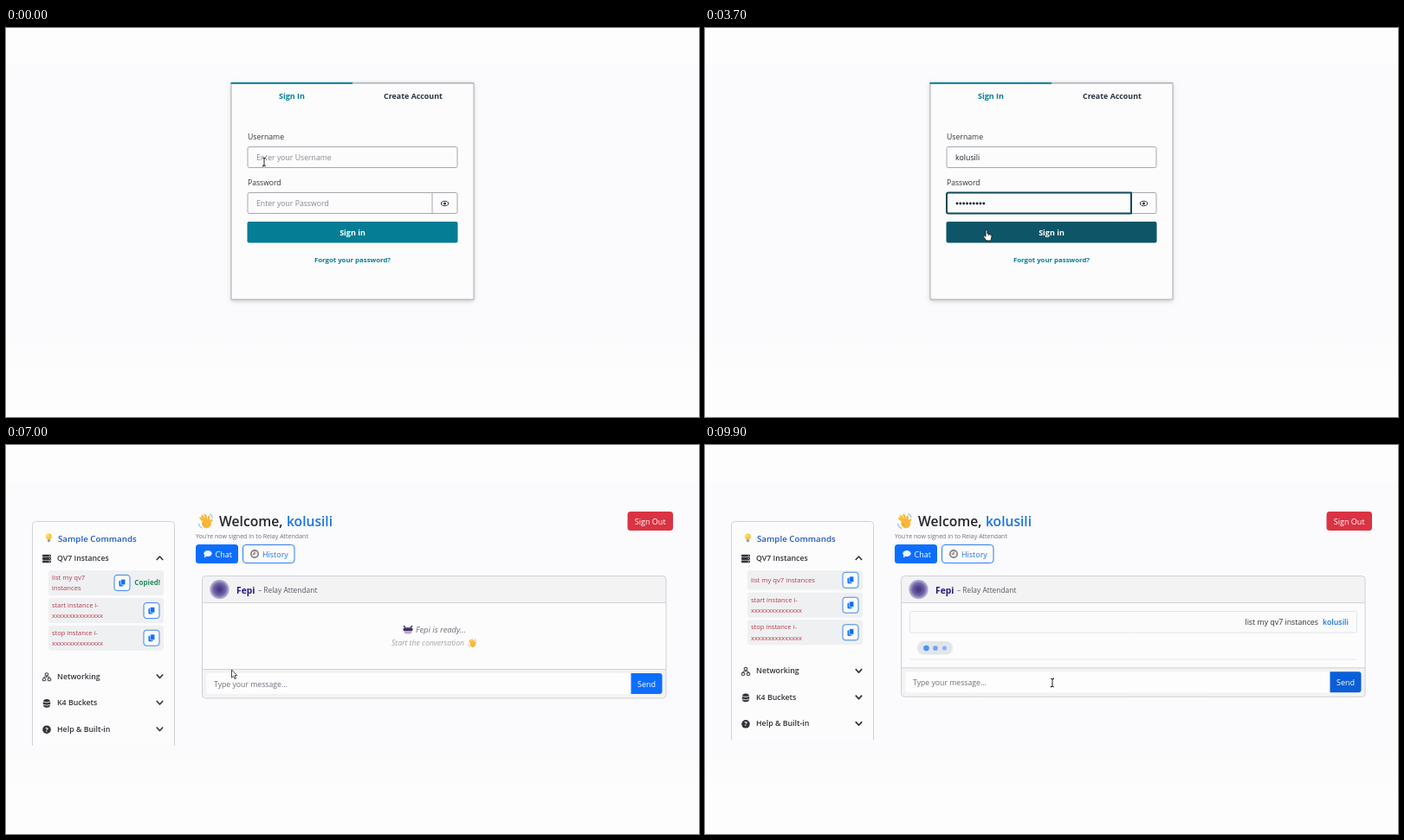
Animation, 800 px wide and 450 px high, one loop 10000 ms. Source, as an HTML page with a canvas:

```html
<!DOCTYPE html>
<html lang="en">
<head>
<meta charset="utf-8">
<title>Sign in and chat</title>
<style>
html, body { margin: 0; width: 100%; height: 100%; overflow: hidden; background: #fdfdfd; }
canvas { display: block; width: 800px; height: 450px; }
</style>
</head>
<body>
<canvas id="stage" width="800" height="450"></canvas>
<script>
const g = document.getElementById('stage').getContext('2d');
const LOOP = 10000, STEP = 100;
const USER = 'kolusili', BOT = 'Fepi', PRODUCT = 'Relay Attendant';
const COMMAND = 'list my qv7 instances';
const TEAL = '#047d95', BLUE = '#0d6efd', INK = '#30343a', LINE = '#cfd2d6';

const clamp = v => Math.max(0, Math.min(1, v));
const ease = v => v * v * (3 - 2 * v);
const ramp = (t, from, to) => ease(clamp((t - from) / (to - from)));

// y is the middle of the lowercase letters
function text(str, x, y, size, color, weight = 400, align = 'left', style = '') {
  g.font = `${style} ${weight} ${size}px "Open Sans", "Noto Sans", sans-serif`;
  g.textAlign = align;
  g.fillStyle = color;
  g.fillText(str, x, y + size * 0.36);
}

function box(x, y, w, h, r, fill, stroke, line = 1) {
  g.beginPath();
  g.roundRect(x, y, w, h, r);
  if (fill) { g.fillStyle = fill; g.fill(); }
  if (stroke) { g.strokeStyle = stroke; g.lineWidth = line; g.stroke(); }
}

function disc(x, y, r, color) {
  g.fillStyle = color;
  g.beginPath();
  g.arc(x, y, r, 0, 7);
  g.fill();
}

function path(points, color, width) {
  g.beginPath();
  points.forEach(([x, y]) => g.lineTo(x, y));
  g.strokeStyle = color;
  g.lineWidth = width;
  g.stroke();
}

function at(x, y, draw, angle = 0, scale = 1) {
  g.save();
  g.translate(x, y);
  g.rotate(angle);
  g.scale(scale, scale);
  draw();
  g.restore();
}

function shadow(color, blur, dy, draw) {
  g.save();
  g.shadowColor = color;
  g.shadowBlur = blur;
  g.shadowOffsetY = dy;
  draw();
  g.restore();
}

function backdrop() {
  g.fillStyle = '#fdfdfd';
  g.fillRect(0, 0, 800, 450);
  const fade = g.createLinearGradient(0, 42, 0, 408);
  fade.addColorStop(0, '#fbfbfd');
  fade.addColorStop(0.85, '#fbfbfd');
  fade.addColorStop(1, '#fdfdfd');
  g.fillStyle = fade;
  g.fillRect(0, 42, 800, 366);
}

function field(x, y, w, radii, focus) {
  box(x, y, w, 24, radii, '#fcfcfd', '#a4a8ad');
  if (focus > 0) {
    g.save();
    g.globalAlpha = focus;
    box(x, y, w, 24, radii, null, '#0d4a5a', 1 + focus);
    g.restore();
  }
}

function caret(x, y, t) {
  if (t % 1000 < 500) {
    g.fillStyle = '#222';
    g.fillRect(x, y - 5.5, 0.9, 11);
  }
}

function eye(x, y) {
  g.strokeStyle = INK;
  g.lineWidth = 1;
  g.beginPath();
  g.ellipse(x, y, 4.1, 2.7, 0, 0, 7);
  g.stroke();
  disc(x, y, 1.5, INK);
}

function suggestions(alpha) {
  g.save();
  g.globalAlpha = alpha;
  g.fillStyle = '#5c5a5c';
  g.beginPath();
  g.moveTo(344, 168);
  g.lineTo(349.5, 162.5);
  g.lineTo(355, 168);
  g.fill();
  box(338, 167.5, 96, 46, 4, '#5c5a5c');
  text(USER, 345, 181, 7.2, '#fff', 600);
  text(USER + '@gnelo.com', 345, 201.5, 7.2, '#fff', 600);
  g.restore();
}

function login(t) {
  shadow('rgba(0,0,0,.2)', 5, 1.5, () => box(260, 63.5, 280, 250.5, 0, '#fcfcfd'));
  box(260, 63.5, 280, 250.5, 0, null, '#a9acaf');
  g.fillStyle = '#b4b8bc';
  g.fillRect(400, 62.8, 140, 1.8);
  g.fillStyle = TEAL;
  g.fillRect(259.5, 62.8, 140.5, 2);
  text('Sign In', 330, 79, 9, TEAL, 700, 'center');
  text('Create Account', 470, 79, 8.9, '#27323c', 700, 'center');

  text('Username', 279, 126, 8.7, INK);
  const userFocus = ramp(t, 150, 350) * (1 - ramp(t, 1850, 2150));
  field(279, 137.5, 242, 2, userFocus);
  const typed = USER.slice(0, Math.floor(clamp((t - 500) / 900) * USER.length));
  if (typed) text(typed, 289, 150, 8.8, '#20282f');
  else text('Enter your Username', 289, 150, 8.7, '#85898e');
  if (t >= 200 && t < 1900) caret(289.5 + (typed ? g.measureText(typed).width : 0), 150, t);

  text('Password', 279, 179, 8.6, INK);
  field(491.5, 190.5, 29.5, [0, 2, 2, 0], 0);
  field(279, 190.5, 213, [2, 0, 0, 2], ramp(t, 1850, 2150));
  eye(506.5, 203);
  const dots = Math.floor(clamp((t - 2200) / 900) * 9);
  for (let i = 0; i < dots; i++) disc(291 + i * 3.85, 203, 1.45, '#20282f');
  if (!dots) text('Enter your Password', 289, 202.5, 8.7, '#85898e');
  if (t >= 1900 && t < 3900) caret(289 + dots * 3.85, 202.5, t);

  box(278.5, 224, 243, 24.5, 2, t >= 3600 ? '#0d5567' : TEAL);
  text('Sign in', 400, 237, 9, '#fff', 700, 'center');
  text('Forgot your password?', 400, 268.5, 7.8, TEAL, 700, 'center');

  const popup = ramp(t, 200, 400) * (1 - ramp(t, 1850, 2200));
  if (popup > 0) suggestions(popup);
}

function wave(x, y, scale, angle) {
  at(x, y, () => {
    g.lineCap = 'round';
    const skin = '#f9b83c';
    path([[-1, 1], [-5.5, -3.5]], skin, 2.5);
    path([[0, 0], [-3.5, -6]], skin, 2.5);
    path([[2, 0], [0, -7]], skin, 2.5);
    path([[4, 1], [4, -5]], skin, 2.5);
    path([[3, 4], [7.3, -1]], skin, 2.5);
    g.fillStyle = skin;
    g.beginPath();
    g.ellipse(1.5, 3, 5.4, 5.3, 0.5, 0, 7);
    g.fill();
    path([[-3.2, 2.2], [0, 5]], '#dc922b', 0.7);
    path([[-7.6, 3], [-6.4, 6], [-4, 8]], '#76b5dd', 1);
    path([[5, -8], [7.4, -6.5], [8.2, -4]], '#76b5dd', 1);
  }, angle, scale);
}

function bulb(x, y) {
  disc(x, y - 1.5, 3.4, '#fbc740');
  disc(x - 1, y - 2.5, 1.2, '#ffe9a0');
  box(x - 1.6, y + 1.5, 3.2, 3.3, 1, '#90a2ad');
}

const icons = {
  server(x, y) {
    for (let i = -1; i <= 1; i++) {
      box(x - 5, y + i * 3.4 - 1.4, 10, 2.8, 0.8, INK);
      disc(x + 3.2, y + i * 3.4, 0.6, '#fff');
    }
  },
  network(x, y) {
    path([[x - 3, y + 2], [x - 3, y], [x + 3, y], [x + 3, y + 2]], INK, 0.9);
    path([[x, y - 2], [x, y]], INK, 0.9);
    [[0, -3], [-3, 3], [3, 3]].forEach(([dx, dy]) =>
      box(x + dx - 1.7, y + dy - 1.3, 3.4, 2.8, 0.4, '#fcfcfd', INK));
  },
  database(x, y) {
    box(x - 4.2, y - 4.8, 8.4, 9.8, [4, 4, 4, 4], INK);
    [-1.7, 1.6].forEach(dy => path([[x - 4.2, y + dy], [x, y + dy + 0.9], [x + 4.2, y + dy]], '#fff', 0.8));
  },
  help(x, y) {
    disc(x, y, 4.8, INK);
    text('?', x, y - 0.2, 7.5, '#fff', 700, 'center');
  }
};

function chevron(x, y, up) {
  const d = up ? -1 : 1;
  path([[x - 3.7, y - 2 * d], [x, y + 2 * d], [x + 3.7, y - 2 * d]], INK, 1.6);
}

function copyButton(x, y) {
  box(x - 9, y - 9, 18, 18, 3, '#fafbfd', '#3b85ea');
  box(x - 3.5, y - 2.5, 5, 6.5, 0.8, BLUE);
  box(x - 1.4, y - 4.2, 5.2, 6.6, 0.8, BLUE, '#fafbfd', 0.7);
}

function commandRow(y, h, lines, copied) {
  const mid = y + h / 2;
  box(49, y, 133, h, 3, '#eff0f2');
  lines.forEach((line, i) =>
    text(line, 53, mid + (i - (lines.length - 1) / 2) * 12.3, lines.length > 1 && !copied ? 7.5 : 7.7, '#b23c4a'));
  copyButton(copied ? 134 : 168, mid);
  if (copied) text('Copied!', 178, mid, 8, '#26895a', 700, 'right');
}

function sidebar(t) {
  const copied = t >= 6600 && t < 8100;
  const open = ramp(t, 6020, 6260);
  const shift = open * (copied ? 106 : 99.6);
  const help = 222.5 + shift;
  const bottom = Math.max(254, help + 19.5);

  if (!open) {
    shadow('rgba(0,0,0,.13)', 4, 1.5, () => box(30.5, 88.5, 164, 165.5, 4, '#fcfcfd'));
    box(30.5, 88.5, 164, 165.5, 4, null, LINE);
  } else {
    g.save();
    g.beginPath();
    g.rect(28, 86, 170, bottom - 86);
    g.clip();
    box(30.5, 88.5, 164, bottom - 70, 4, '#fcfcfd', LINE);
    g.restore();
  }
  bulb(49.5, 107.5);
  text('Sample Commands', 60, 108, 9.75, '#2059c4', 600);

  const hover = t >= 5900 && t < 6400 ? 4 : 0;
  if (hover) box(43, 121, 139, 20.5, 4, '#f2f4f6');
  icons.server(47 + hover, 131.5);
  text('QV7 Instances', 59 + hover, 131, 8.75, INK, 600);
  chevron(177.5 - hover, 131, open > 0);

  const rows = [['network', 'Networking'], ['database', 'K4 Buckets'], ['help', 'Help & Built-in']];
  rows.forEach(([icon, label], i) => {
    const y = 161.5 + i * 30.5 + shift;
    icons[icon](47, y + 0.7);
    text(label, 59, y, 8.8, INK, 600);
    chevron(177.5, y, false);
  });

  if (open > 0) {
    g.save();
    g.beginPath();
    g.rect(40, 143, 150, shift);
    g.clip();
    const extra = copied ? 6.4 : 0;
    commandRow(145, 22.5 + extra, copied ? ['list my qv7', 'instances'] : [COMMAND], copied);
    ['start', 'stop'].forEach((verb, i) =>
      commandRow(170.7 + extra + i * 31.6, 29, [verb + ' instance i-', 'x'.repeat(15)], false));
    g.restore();
  }
}

function header(t) {
  wave(230, 88, 1, 0.12 * Math.sin(t / 1000 * Math.PI * 2));
  text('Welcome,', 246, 88.5, 15.7, '#23272c', 600);
  text(USER, 324, 88.5, 15.6, '#1a73e0', 600);
  text(`You're now signed in to ${PRODUCT}`, 219, 105, 7.05, '#6d7278');
  box(717.5, 77, 52.5, 22, 3.5, '#d93344');
  text('Sign Out', 743.7, 88.7, 9, '#fff', 400, 'center');

  box(219, 115, 49, 22, 3.5, BLUE);
  g.fillStyle = '#eef4ff';
  g.beginPath();
  g.ellipse(233, 125.6, 4.7, 3.5, 0, 0, 7);
  g.fill();
  path([[230.5, 127], [229.5, 130]], '#eef4ff', 1.5);
  text('Chat', 241.5, 126.5, 9, '#fff');

  box(273.5, 115.5, 59.5, 21, 3.5, '#fcfcfd', '#2f7fe8');
  disc(287, 126, 4.9, '#6f7178');
  disc(287, 126, 3.5, '#eceaea');
  path([[287, 123.3], [287, 126.2], [284.8, 126.2]], '#a33d42', 0.9);
  text('History', 296, 126.5, 8.95, '#2373e2');
}

function avatar(x, y) {
  const glow = g.createRadialGradient(x, y, 2, x, y, 11.5);
  glow.addColorStop(0, '#4b3a86');
  glow.addColorStop(0.55, '#7367a9');
  glow.addColorStop(1, '#c9c5dd');
  disc(x, y, 11.3, glow);
}

function visor(x, y) {
  box(x - 4.5, y - 3.5, 9, 8, 3, '#b9a9d4');
  box(x - 5.5, y - 2.5, 11, 3.6, 1.4, '#41315f');
  path([[x - 5, y - 5], [x - 3, y - 3]], '#41315f', 1.4);
  path([[x + 5, y - 5], [x + 3, y - 3]], '#41315f', 1.4);
}

function typingDots(t) {
  box(245, 227, 41, 15.5, 7.7, '#e2e6eb');
  for (let i = 0; i < 3; i++) {
    const pulse = Math.pow(0.5 + 0.5 * Math.cos(2 * Math.PI * ((t - 9900) / 1200 - i * 0.2)), 2);
    g.globalAlpha = 0.42 + 0.28 * pulse;
    disc(255.5 + i * 10.5, 235, 2.5 + 0.8 * pulse, BLUE);
  }
  g.globalAlpha = 1;
  g.fillStyle = '#e3e5e8';
  g.fillRect(236, 247.5, 516, 1);
}

function chat(t) {
  const sent = t >= 8500, waiting = t >= 8700;
  const foot = !sent ? 259.5 : waiting ? 257.8 : 226.5;
  box(226.5, 151.5, 535.5, foot + 33.5 - 151.5, 4, '#fcfcfd');
  box(226.5, 151.5, 535.5, 31, [4, 4, 0, 0], '#f3f3f4');
  box(226.5, foot, 535.5, 33.5, [0, 0, 4, 4], '#f3f3f4');
  g.fillStyle = LINE;
  g.fillRect(226.5, 182, 535.5, 1);
  g.fillRect(226.5, foot - 0.5, 535.5, 1);
  box(226.5, 151.5, 535.5, foot + 33.5 - 151.5, 4, null, LINE);

  avatar(246.5, 167);
  text(BOT, 266, 168, 10.3, '#2b1780', 700);
  text('– ' + PRODUCT, 291, 168, 8.4, '#555b62');

  if (!sent) {
    visor(464, 214);
    text(BOT + ' is ready...', 473, 214, 9.4, '#6c7278', 400, 'left', 'italic');
    text('Start the conversation', 445, 229, 8.7, '#a0a4a8', 400, 'left', 'italic');
    wave(538, 229, 0.58, 0);
  } else {
    const shown = ramp(t, 8480, 8720);
    const y = 205 + 4 * (1 - shown);
    g.globalAlpha = 0.25 + 0.75 * shown;
    box(236.5, y - 12.5, 516, 24.5, 1, '#fbfbfc', '#e1e4e7');
    text(COMMAND, 708, y, 8.8, INK, 400, 'right');
    text(USER, 743, y, 8.8, '#1a73d6', 600, 'right');
    g.globalAlpha = 1;
    if (waiting) typingDots(t);
  }

  box(231.5, foot + 4.5, 490, 24, [3, 0, 0, 3], '#fdfdfe');
  const filled = t >= 7600 && t < 8700;
  text(filled ? COMMAND : 'Type your message...', 240, foot + 17, filled ? 8.9 : 8.7, filled ? INK : '#6c7177');
  box(721.5, foot + 4.5, 36, 24, [0, 3, 3, 0], waiting || (t >= 8200 && !sent) ? '#0b5ed7' : BLUE);
  text('Send', 739.5, foot + 17, 9, '#fff', 400, 'center');
}

const pointers = {
  beam() {
    const shape = [[-2, -5], [0, -4], [2, -5], [0, -4], [0, 4], [-2, 5], [0, 4], [2, 5]];
    path(shape, '#fff', 2);
    path(shape, '#222', 1);
  },
  arrow() {
    const tip = new Path2D('M0 0V9.2L2.1 7.2L3.6 10.6L5 10L3.6 6.7H6.4Z');
    g.fillStyle = '#fff';
    g.strokeStyle = '#333';
    g.lineWidth = 0.9;
    g.fill(tip);
    g.stroke(tip);
  },
  hand() {
    const glove = new Path2D('M-1 1Q0-.6 1 1V5L5 5.8Q6.4 6.3 6 8.5L5 13H-.2L-3.6 8.4Q-3.6 6.8-2.3 7.2L-1 8.3Z');
    g.fillStyle = '#fff';
    g.strokeStyle = '#222';
    g.lineWidth = 1;
    g.fill(glove);
    g.stroke(glove);
    path([[2.4, 5.5], [2.4, 7.5]], '#222', 0.6);
    path([[4.2, 6], [4.2, 7.8]], '#222', 0.6);
  }
};

// time, x, y, pointer from then on
const moves = [
  [0, 298, 155, 'beam'], [1500, 298, 155, 'beam'], [1900, 300, 197, 'beam'],
  [3200, 300, 197, 'beam'], [3600, 325, 233, 'hand'], [5000, 325, 233, 'arrow'],
  [5200, 325, 233, 'arrow'], [5900, 98.5, 137, 'hand'], [6250, 98.5, 137, 'hand'],
  [6500, 167, 157, 'hand'], [6700, 167, 157, 'arrow'], [7000, 260.5, 260, 'arrow'],
  [7300, 305, 276, 'beam'], [7700, 305, 276, 'beam'], [8050, 766, 281, 'arrow'],
  [8200, 753, 274, 'hand'], [8500, 753, 274, 'arrow'], [8900, 753, 274, 'arrow'],
  [9500, 401, 275, 'beam'], [LOOP, 401, 275, 'beam']
];

function pointer(t) {
  const i = moves.findIndex(m => m[0] > t) - 1;
  const [t0, x0, y0, kind] = moves[i], [t1, x1, y1] = moves[i + 1];
  const p = ramp(t, t0, t1);
  at(x0 + (x1 - x0) * p, y0 + (y1 - y0) * p, pointers[kind]);
}

function render(t) {
  g.globalAlpha = 1;
  g.lineCap = 'butt';
  g.lineJoin = 'round';
  backdrop();
  if (t < 4800) login(t);
  else if (t >= 5200) {
    header(t);
    sidebar(t);
    chat(t);
  }
  pointer(t);
}

const start = performance.now();
function tick() {
  const t = (performance.now() - start) % LOOP;
  render(Math.floor(t / STEP) * STEP);
  requestAnimationFrame(tick);
}
tick();
</script>
</body>
</html>
```
